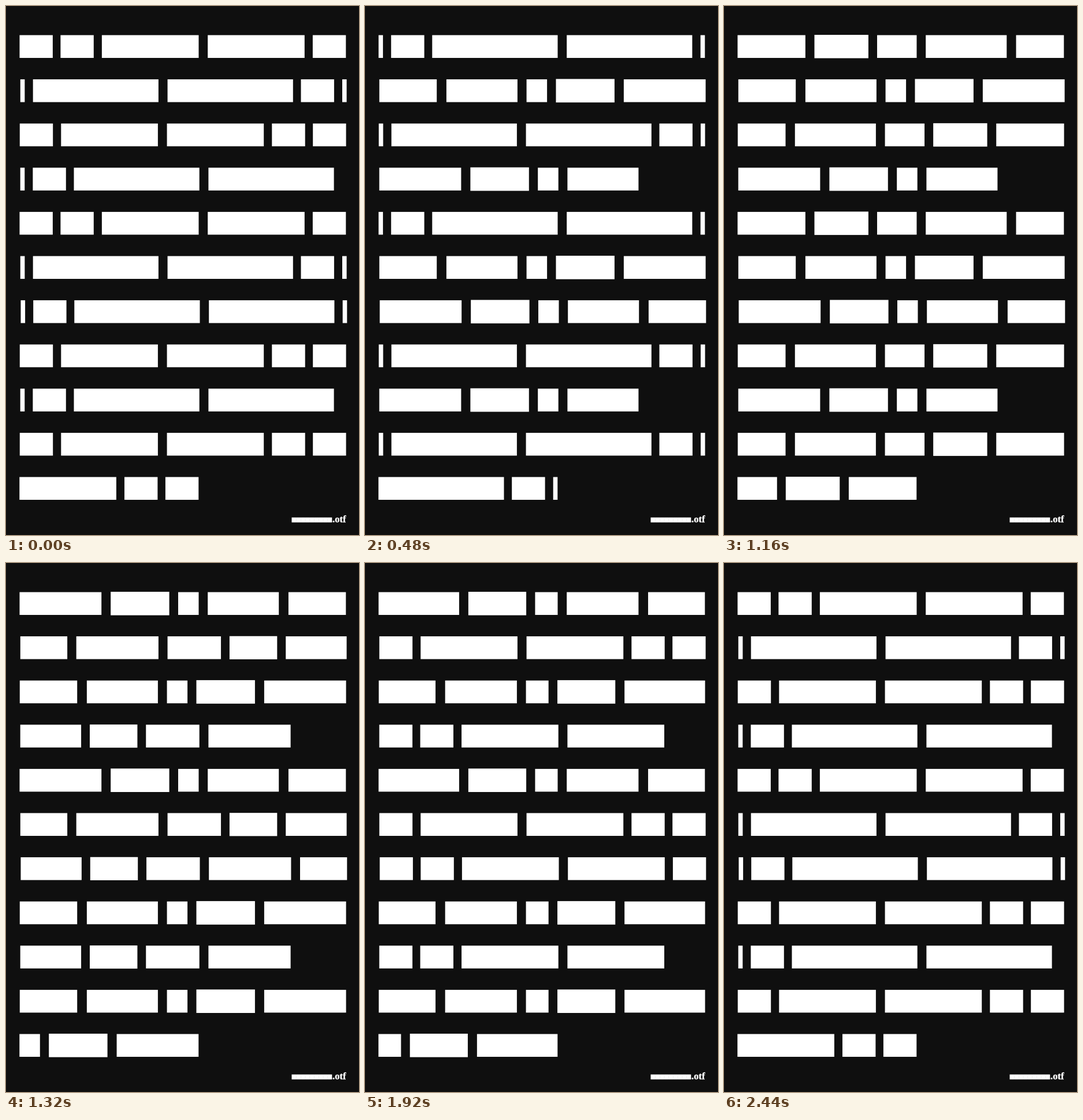
These frames come from a looping animation (611x917 px, 2640 ms). An HTML page with a canvas:

```html
<!DOCTYPE html>
<html lang="en">
<head>
<meta charset="utf-8">
<title>Bars</title>
<style>
html, body { margin: 0; width: 100%; height: 100%; overflow: hidden; background: #0f0f0f; }
canvas { display: block; }
</style>
</head>
<body>
<canvas id="stage" width="611" height="917"></canvas>
<script>
const ctx = document.getElementById("stage").getContext("2d");
const LOOP = 2640, TICK = 40;
const WORD = 310, PAIR_X = 325.7, ROW_W = 564.8;
const TOP = 50.5, PITCH = 76.6, BAR_H = 39.5;

// poses: first width, middle offset, middle width, last width, pair widths
const EVEN = [57.4, 70.9, 57.4, 167.6, 167.6, 57.4];
const THIN = [7.6, 21.7, 57.4, 217.2, 217.2, 7.6];
const WIDE = [141.7, 157.7, 101.4, 35.5, 123, 99.4];

// each track: start pose, then [from ms, to ms, pose, amount reached]
const odd = { first: EVEN, moves: [[0, 320, THIN], [785, 1300, WIDE], [1876, 2325, EVEN]] };
const opening = [[128, 480, WIDE], [1187, 1480, EVEN]];
const even = { first: THIN, moves: [...opening, [1918, 2360, THIN, 1.16]] };
const late = { first: THIN, moves: [...opening, [2080, 2440, THIN]] };
const SETTLE = 2440;

// rows: track, left edge, mirrored, number of bars
const rows = [
  [odd, 23.5, false, 5],
  [even, 24.8, true, 5],
  [odd, 23.8, true, 5],
  [late, 24.7, false, 4],
  [odd, 23.5, false, 5],
  [even, 24.8, true, 5],
  [even, 25.5, false, 5],
  [odd, 23.8, true, 5],
  [late, 24.7, false, 4],
  [odd, 23.8, true, 5],
  [odd, 23.3, true, 3]
];

function ease(t, from, to) {
  const s = Math.min(1, Math.max(0, (t - from) / (to - from)));
  return s * s * (3 - 2 * s);
}

function poseAt(track, t) {
  let pose = track.first;
  for (const [from, to, next, reach = 1] of track.moves) {
    if (t <= from) break;
    let k = reach * ease(t, from, to);
    if (reach > 1) k -= (reach - 1) * ease(t, to, SETTLE);
    pose = pose.map((v, i) => v + (next[i] - v) * k);
  }
  return pose;
}

function drawRow([track, left, mirrored, count], index, t) {
  const [a, midX, mid, c, u, v] = poseAt(track, t);
  const swell = (mid - 57.4) / 44 * 0.6;
  const width = count > 3 ? ROW_W : WORD;
  const y = TOP + index * PITCH;
  const bars = [
    [0, a, 0],
    [midX, mid, swell],
    [WORD - c, c, 0],
    [PAIR_X, u, 0],
    [ROW_W - v, v, 0]
  ];
  for (const [x, w, grow] of bars.slice(0, count)) {
    if (w <= 0) continue;
    const bx = left + (mirrored ? width - x - w : x);
    ctx.fillRect(bx, y - grow, w, BAR_H + 2 * grow);
  }
}

function drawLabel() {
  ctx.fillRect(494.5, 886.6, 69.8, 8.6);
  ctx.fillStyle = "#e6e6e6";
  for (let i = 1; i < 9; i++) ctx.fillRect(494.5 + i * 7.75, 887, 0.6, 8);
  ctx.fillStyle = "#fff";
  ctx.font = "bold 16.5px 'Liberation Serif', serif";
  ctx.textAlign = "right";
  ctx.fillText(".otf", 588.4, 895);
  ctx.strokeStyle = "#fff";
  ctx.lineWidth = 0.4;
  ctx.strokeText(".otf", 588.4, 895);
}

const begin = performance.now();

function draw() {
  const t = Math.floor(((performance.now() - begin) % LOOP) / TICK) * TICK;
  ctx.fillStyle = "#0f0f0f";
  ctx.fillRect(0, 0, 611, 917);
  ctx.fillStyle = "#fff";
  rows.forEach((row, i) => drawRow(row, i, t));
  drawLabel();
  requestAnimationFrame(draw);
}
draw();
</script>
</body>
</html>
```
